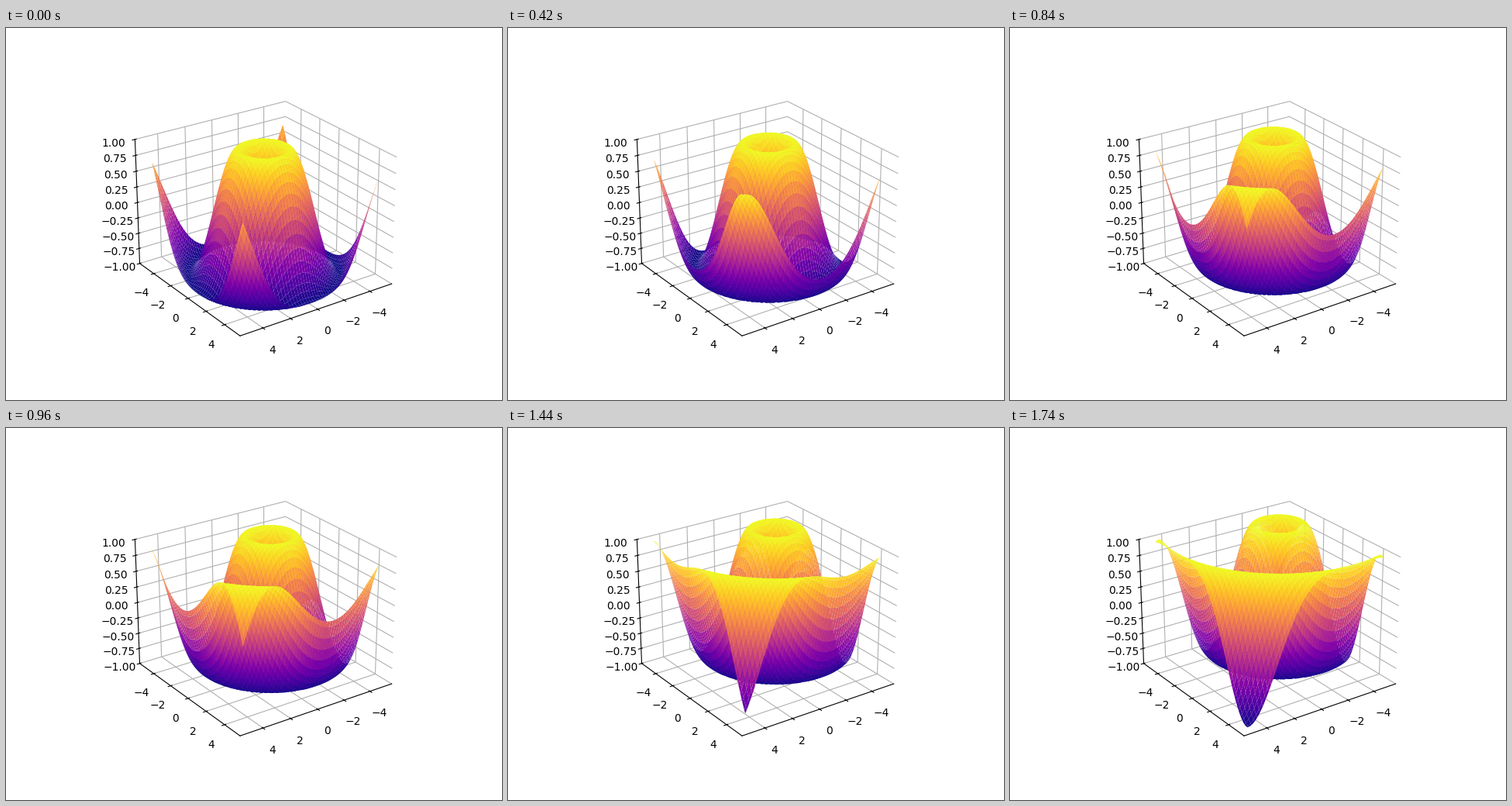
These frames come from a looping animation (640x480 px, 1800 ms). A matplotlib script:

```python
import numpy as np
import matplotlib.pyplot as plt
from matplotlib.animation import FuncAnimation

FRAMES = 30
INTERVAL = 60
SHIFT = 0.1  # how far the ripple's centre drifts per frame

fig = plt.figure(figsize=(6.4, 4.8), dpi=100)
ax = fig.add_subplot(projection="3d")
ax.view_init(elev=25, azim=55)
ax.set_zlim(-1, 1)
for axis in (ax.xaxis, ax.yaxis, ax.zaxis):
    axis.set_pane_color((1, 1, 1, 1))

side = np.arange(-5, 5, 0.1)
x, y = np.meshgrid(side, side)
surface = None


def draw(frame):
    global surface
    if surface is not None:
        surface.remove()
    shift = SHIFT * frame
    z = np.sin(np.hypot(x + shift, y + shift))
    surface = ax.plot_surface(x, y, z, cmap="plasma")
    return [surface]


anim = FuncAnimation(fig, draw, frames=FRAMES, init_func=lambda: [],
                     interval=INTERVAL, repeat=True, repeat_delay=0)
plt.show()
```
